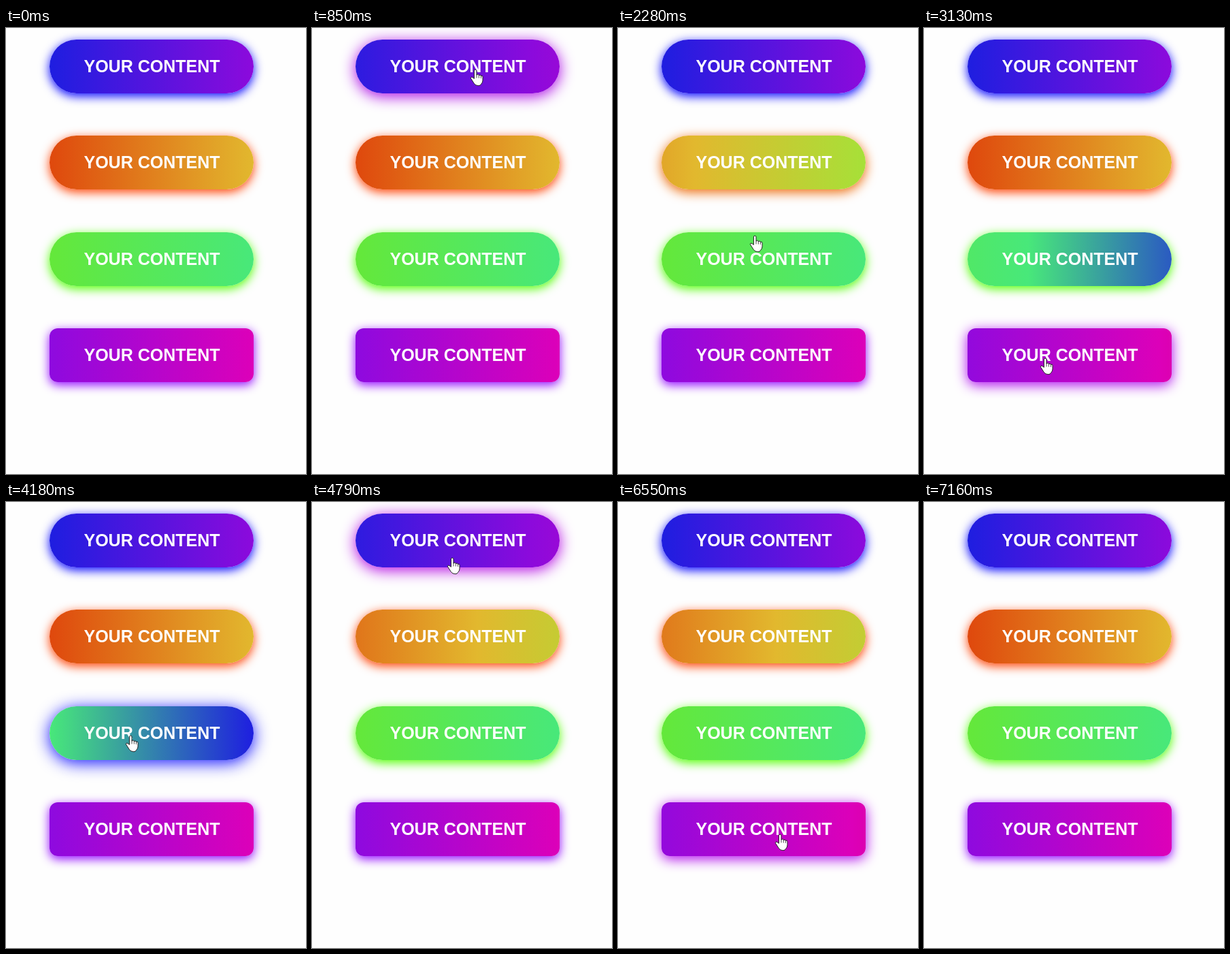
Animation of 441 by 655 pixels, one loop 7520 ms. Source, as an HTML page:

```html
<!DOCTYPE html>
<html lang="en">
<head>
<meta charset="utf-8">
<style>
html, body { margin: 0; width: 100%; height: 100%; overflow: hidden; background: #fefefe; }
.button {
  position: absolute; left: 64px; width: 300px; height: 79px;
  border-radius: 40px; background-size: 200% 100%;
  font: bold 25px/78px "Liberation Sans", Arial, sans-serif;
  color: #fff; text-align: center; text-indent: 1px; white-space: nowrap;
}
#hand { position: absolute; left: 0; top: -1px; overflow: visible; }
</style>
</head>
<body>
<svg id="hand" width="1" height="1" fill="#fff" stroke="#222" stroke-linejoin="round" stroke-linecap="round">
  <path d="M-1.6 13V1.9a1.8 1.8 0 0 1 3.6 0V8q3-2 3.300.5 2.700-1.500 3.100.8 2.600-1 2.600 1.400V16q0 3-2.500 5.500-1 2.200-3.700 2.200-4.500 0-6.500-3.200l-4.700-7.300c-.9-1.700.9-2.800 2.200-1.800z"/>
  <path fill="none" stroke-width=".8" d="M2 8v4M5.300 8.500v3.700M8.400 9.300v3.200"/>
</svg>
<script>
const LOOP = 7520, SLIDE = 400, GLOW = 150;

// colors run across twice the width; glow: at rest, hovered
const buttons = [
  { colors: ["#1e1ee0", "#8c0adc", "#dc00b9"], glow: ["#00f", "#f000d8"] },
  { colors: ["#df480d", "#e2b82e", "#9be83a"], glow: ["#ff4000", "#a8ff10"] },
  { colors: ["#64e83a", "#48e87a", "#1e1ee0"], glow: ["#50ff00", "#1010ff"] },
  { colors: ["#8e0adf", "#dc00b9", "#e00038"], glow: ["#9000ff", "#d800d0"] },
];

// The pointer rests between moves: start, duration, x, y
const entry = [385, 622];
const moves = [
  [60, 370, 395, 340], [430, 420, 240, 62], [1200, 360, 226, 195],
  [2050, 350, 192, 345], [2880, 350, 175, 518], [3690, 140, 183, 345],
  [4170, 180, 198, 200], [4500, 245, 206, 83], [5070, 330, 250, 205],
  [6270, 290, 238, 490], [6720, 270, 226, 603],
];
const [lastStart, lastSpan] = moves[moves.length - 1];

const mix = (a, b, k) => a + (b - a) * k;
const ease = k => (1 - Math.cos(Math.PI * Math.min(1, Math.max(0, k)))) / 2;

function pointer(time) {
  let [x, y] = entry;
  for (const [start, span, toX, toY] of moves) {
    const k = ease((time - start) / span);
    x = mix(x, toX, k);
    y = mix(y, toY, k);
  }
  return [x, y];
}

// An interrupted transition turns back from where it is, in a shorter time.
function level(toggles, time, duration) {
  let from = 0, goal = 0, start = 0, span = 1;
  const at = t => mix(from, goal, ease((t - start) / span));
  for (const toggle of toggles) {
    if (toggle > time) break;
    from = at(toggle);
    goal = 1 - goal;
    start = toggle;
    span = Math.max(1, duration * Math.abs(goal - from));
  }
  return at(time);
}

// Times at which the pointer enters and leaves a button, in turn
function hoverTimes(top) {
  const times = [];
  for (let t = 0; t < LOOP; t += 4) {
    const [x, y] = pointer(t);
    const inside = x >= 64 && x < 364 && y >= top && y < top + 79;
    if (inside !== (times.length % 2 === 1)) times.push(t);
  }
  return times;
}

buttons.forEach((b, i) => {
  const top = Math.floor(17 + i * 141.5);
  b.hover = hoverTimes(top);
  b.el = document.createElement("div");
  b.el.className = "button";
  b.el.textContent = "YOUR CONTENT";
  b.el.style.top = top + "px";
  b.el.style.backgroundImage = `linear-gradient(to right, ${b.colors})`;
  document.body.insertBefore(b.el, hand);
});
buttons[3].el.style.borderRadius = "12px";

function draw(time) {
  for (const { el, hover, glow } of buttons) {
    const lit = level(hover, time, GLOW);
    const color = `color-mix(in srgb, ${glow[1]} ${lit * 100}%, ${glow[0]})`;
    el.style.backgroundPosition = level(hover, time, SLIDE) * 100 + "% 0";
    el.style.boxShadow = `0 4px ${mix(15, 25, lit)}px ${color}`;
  }
  const [x, y] = pointer(time).map(Math.round);
  hand.style.display = time >= moves[0][0] && time < lastStart + lastSpan ? "" : "none";
  hand.style.transform = `translate(${x}px, ${y}px)`;
}

const begin = performance.now();
function tick() {
  draw((performance.now() - begin) % LOOP);
  requestAnimationFrame(tick);
}
tick();
</script>
</body>
</html>
```
